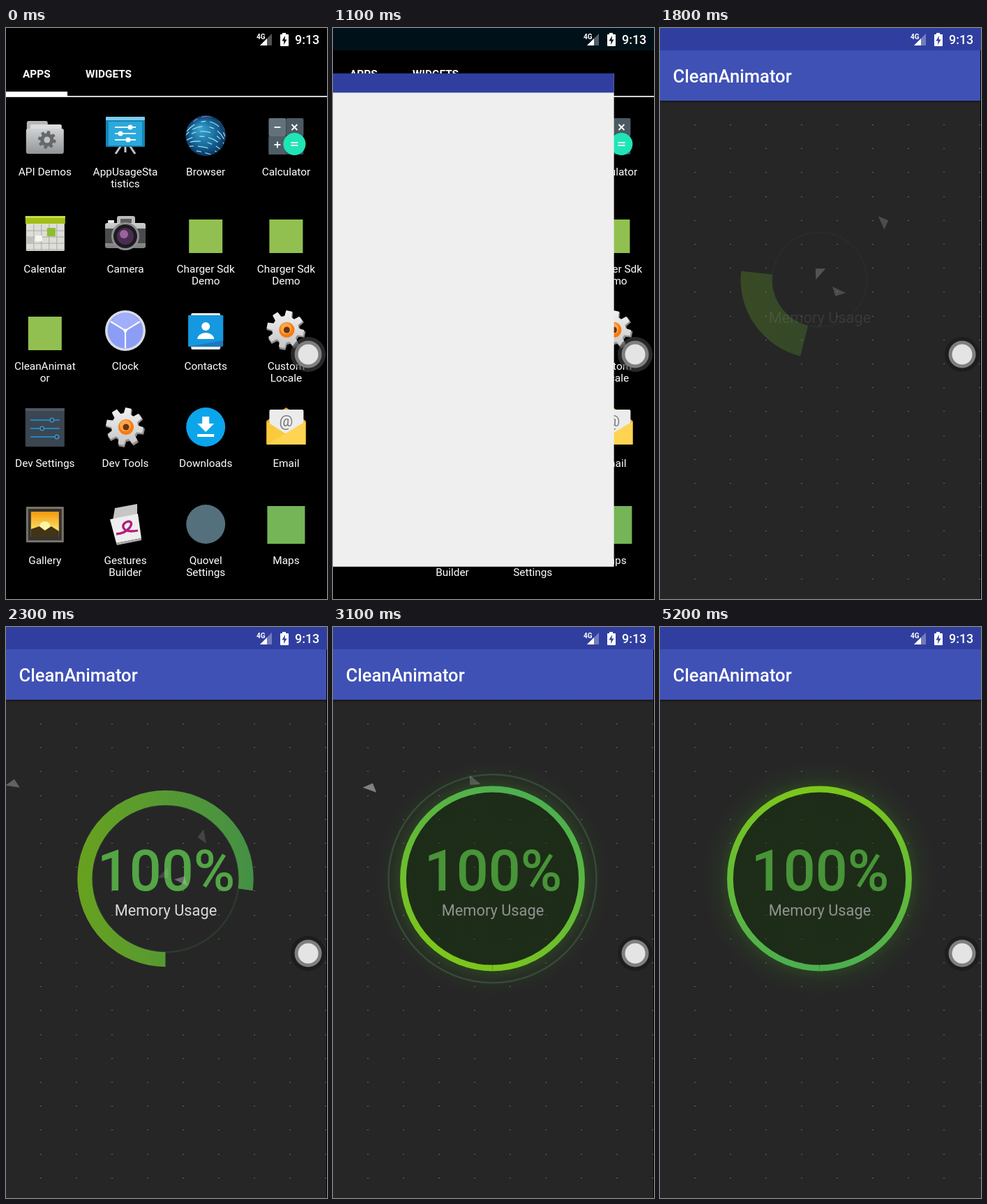
An HTML page with a canvas that plays this animation: 460 by 817 pixels, repeating every 5300 ms.

```html
<!DOCTYPE html>
<html lang="en">
<head>
<meta charset="utf-8">
<title>Memory usage</title>
<style>
html, body { margin: 0; width: 100%; height: 100%; overflow: hidden; background: #000; }
canvas { display: block; }
</style>
</head>
<body>
<canvas id="stage" width="460" height="817"></canvas>
<script>
const W = 460, H = 817, LOOP = 5300, STEP = 100;
const CX = 228.5, CY = 360;
const g = document.getElementById('stage').getContext('2d');
const clamp = (v, lo = 0, hi = 1) => Math.min(hi, Math.max(lo, v));
const lerp = (a, b, p) => a + (b - a) * p;
const rad = deg => deg * Math.PI / 180;

function rect(color, x, y, w, h, r = 0) {
  g.fillStyle = color;
  g.beginPath();
  g.roundRect(x, y, w, h, r);
  g.fill();
}

function disc(color, x, y, r) {
  g.fillStyle = color;
  g.beginPath();
  g.arc(x, y, r, 0, 7);
  g.fill();
}

function ring(color, x, y, r, width, from = 0, to = 360) {
  g.strokeStyle = color;
  g.lineWidth = width;
  g.beginPath();
  g.arc(x, y, r, rad(from), rad(to));
  g.stroke();
}

function poly(color, ...pts) {
  g.fillStyle = color;
  g.beginPath();
  for (let i = 0; i < pts.length; i += 2) g.lineTo(pts[i], pts[i + 1]);
  g.closePath();
  g.fill();
}

function line(color, width, ...pts) {
  g.strokeStyle = color;
  g.lineWidth = width;
  g.beginPath();
  for (let i = 0; i < pts.length; i += 2) g.lineTo(pts[i], pts[i + 1]);
  g.stroke();
}

function text(str, x, y, size, color = '#fff', weight = 400, align = 'center') {
  g.font = `${weight} ${size}px Roboto, sans-serif`;
  g.textAlign = align;
  g.fillStyle = color;
  g.fillText(str, x, y);
}

function fade(top, bottom, y0, y1) {
  const f = g.createLinearGradient(0, y0, 0, y1);
  f.addColorStop(0, top);
  f.addColorStop(1, bottom);
  return f;
}

function gear(color, x, y, r, teeth, depth) {
  const pts = [], unit = Math.PI * 2 / teeth;
  for (let i = 0; i < teeth; i++) {
    for (const [at, len] of [[-.34, r - depth], [-.2, r], [.2, r], [.34, r - depth]]) {
      const a = (i + at) * unit + .2;
      pts.push(x + len * Math.cos(a), y + len * Math.sin(a));
    }
  }
  poly(color, ...pts);
}

function sliders(color, knob, xs, y, gap, half) {
  xs.forEach((x, i) => {
    line(color, 2, -half, y + i * gap, half, y + i * gap);
    disc(knob, x, y + i * gap, 3.5);
  });
}

// Icons are drawn around their own centre.
function toolGear() {
  gear('#8f8f8f', 0, 1, 28, 8, 8);
  gear(fade('#f2f2f2', '#c4c4c4', -28, 28), -1, -1, 27, 8, 8);
  disc('#f57c12', 1, 0, 11);
  disc('#ffa64a', 0, -2, 8);
  disc('#6b3210', 1, 0, 4.5);
}

const greenSquare = () => rect('#92c050', -24, -19, 48, 48);

const icons = {
  folder() {
    rect('#b5b7b9', -26, -21, 30, 14, 3);
    rect('#dcdcdc', -21, -16, 45, 20, 2);
    rect(fade('#d0d2d3', '#929597', -10, 26), -27, -10, 54, 36, 3);
    gear('#65696d', 3, 6, 13, 8, 3.5);
    disc('#c0c2c4', 3, 6, 4.5);
  },
  board() {
    line('#c4c4c4', 3, -6, 14, -14, 26);
    line('#c4c4c4', 3, 6, 14, 14, 26);
    line('#c4c4c4', 3, 0, 14, 0, 24);
    rect('#1385b8', -28, -26, 56, 42, 1);
    rect('#2ba9dc', -24, -20, 48, 34);
    rect('#7ccdec', -28, -27, 56, 5, 1);
    sliders('#e9f7fc', '#fff', [7, -7, 4], -12, 9, 15);
  },
  globe() {
    const f = g.createRadialGradient(-8, -10, 2, 0, 0, 29);
    f.addColorStop(0, '#3aa0cb');
    f.addColorStop(.6, '#176b9c');
    f.addColorStop(1, '#0b3560');
    disc(f, 0, 0, 29);
    g.save();
    g.beginPath();
    g.arc(0, 0, 28, 0, 7);
    g.clip();
    g.setLineDash([15, 10, 7, 6]);
    for (let i = 0; i < 9; i++) {
      g.lineDashOffset = i * 9;
      g.strokeStyle = i > 6 ? '#a46bd0' : '#9bd8ee';
      g.lineWidth = 1.3;
      g.beginPath();
      g.ellipse(-4, 34 - i * 2, 34, 10 + i * 5.5, .25, Math.PI, 6.28);
      g.stroke();
    }
    g.restore();
  },
  calculator() {
    rect('#63717a', -25, -25, 25, 26, 2);
    rect('#4b5963', 0, -25, 25, 26, 2);
    rect('#3c4a54', -25, 1, 50, 26, 2);
    rect('#4f5d66', -25, 1, 25, 26);
    line('#fff', 1.8, -17, -12, -8, -12);
    line('#fff', 1.8, -17, 13, -8, 13);
    line('#fff', 1.8, -12.5, 8.5, -12.5, 17.5);
    line('#fff', 1.8, 8, -16, 16, -8);
    line('#fff', 1.8, 16, -16, 8, -8);
    disc('#1fe5b6', 12, 12, 16);
    line('#fff', 1.8, 7, 10, 17, 10);
    line('#fff', 1.8, 7, 14, 17, 14);
  },
  calendar() {
    rect('#deded8', -27, -24, 55, 50, 1);
    rect('#a2bf18', -28, -24, 57, 11);
    rect('#c2de42', -28, -24, 57, 3);
    for (let x = -16; x < 26; x += 11) line('#a9aaa4', 1, x, -12, x, 25);
    for (let y = -3; y < 25; y += 9) line('#a9aaa4', 1, -27, y, 28, y);
    rect('#f7f7f2', -14, 4, 10, 8);
    rect('#bfc0ba', -26, 7, 9, 9);
    rect('#8fbd30', 3, -7, 12, 12);
  },
  camera() {
    rect('#b9bbbc', -12, -24, 26, 15, 3);
    rect('#5b5d5f', -7, -20, 16, 8, 1);
    rect(fade('#d3d4d5', '#7e8082', -16, 20), -29, -14, 58, 36, 3);
    rect('#4a4b4d', -29, -6, 58, 21);
    disc('#8d8e90', 0, 5, 20);
    disc('#1d1b20', 0, 5, 17);
    disc('#492d51', 0, 5, 12);
    disc('#9c629f', -2, 2, 6);
    rect('#e7e7e7', -25, -18, 9, 4, 1);
  },
  square: greenSquare,
  clock() {
    disc('#d9dbe5', 0, 1, 29);
    disc('#8c9df5', 0, 1, 25.5);
    poly('#a0aefb', 0, 1, -22, -11, -12, -21, 0, -24.5, 12, -21, 22, -11);
    line('#f5f6ff', 2.2, -21, -12, 0, 1, 21, -12);
    line('#f5f6ff', 2.2, 0, 1, 0, 26);
    disc('#fff', 0, 1, 2.5);
  },
  contacts() {
    rect('#e8eaeb', -21, -24, 42, 52, 2);
    rect('#1d78be', -25, -21, 50, 45, 2);
    poly('#1598e0', -25, -21, 25, -21, 25, 15, -25, 24);
    disc('#fff', 0, -5, 6);
    g.fillStyle = '#fff';
    g.beginPath();
    g.ellipse(0, 13, 12, 9, 0, Math.PI, 0);
    g.fill();
  },
  toolGear,
  settings() {
    rect('#3b4650', -28, -27, 56, 55, 1);
    rect('#4c5a66', -28, -27, 56, 4);
    g.save();
    g.translate(0, 1);
    sliders('#1f87c4', '#3d92c9', [10, -4, 17], -11, 12, 21);
    [[10, -11], [-4, 1], [17, 13]].forEach(([x, y]) => disc('#333d46', x, y, 2));
    g.restore();
  },
  download() {
    disc('#0ba5ec', 0, 0, 28);
    poly('#fff', -5, -15, 5, -15, 5, -5, 12, -5, 0, 7, -12, -5, -5, -5);
    rect('#fff', -12, 10, 24, 4);
  },
  email() {
    poly('#e5a91f', -28, -9, 0, -28, 28, -9, 28, 24, -28, 24);
    rect('#ececec', -24, -25, 49, 36, 2);
    text('@', 0, -1, 22, '#787878');
    poly('#fbc93c', -28, -8, 0, 10, 28, -8, 28, 25, -28, 25);
    poly('#ffd452', -28, 25, 28, -8, 28, 25);
  },
  gallery() {
    rect('#77736c', -27, -25, 54, 51, 1);
    rect('#35332f', -24, -22, 48, 45);
    rect(fade('#f19c10', '#ffe16b', -17, 9), -20, -18, 40, 36);
    disc('#fff3a4', 0, 4, 8);
    poly('#423415', -20, 18, -20, 7, -8, 3, 0, 9, 9, 3, 20, 10, 20, 18);
  },
  gestures() {
    poly('#c6c6c6', -15, -23, 17, -29, 17, -11, -18, -5);
    poly('#eeeeee', -22, -7, 18, -15, 23, 20, -13, 27);
    poly('#a8a8a8', -13, 27, 23, 20, 23, 23, -12, 30);
    g.strokeStyle = '#b61d79';
    g.lineWidth = 3.3;
    g.beginPath();
    g.moveTo(-13, 14);
    g.bezierCurveTo(5, 13, 15, -4, 4, -4);
    g.bezierCurveTo(-8, -1, -6, 14, 18, 9);
    g.stroke();
  },
  dot: () => disc('#54707c', 0, 0, 28),
  mapSquare: () => rect('#75b457', -27, -26, 54, 54)
};

const apps = [
  ['folder', 'API Demos'], ['board', 'AppUsageSta', 'tistics'], ['globe', 'Browser'], ['calculator', 'Calculator'],
  ['calendar', 'Calendar'], ['camera', 'Camera'], ['square', 'Charger Sdk', 'Demo'], ['square', 'Charger Sdk', 'Demo'],
  ['square', 'CleanAnimat', 'or'], ['clock', 'Clock'], ['contacts', 'Contacts'], ['toolGear', 'Custom', 'Locale'],
  ['settings', 'Dev Settings'], ['toolGear', 'Dev Tools'], ['download', 'Downloads'], ['email', 'Email'],
  ['gallery', 'Gallery'], ['gestures', 'Gestures', 'Builder'], ['dot', 'Quovel', 'Settings'], ['mapSquare', 'Maps']
];

function launcher() {
  rect('#000', 0, 0, W, H);
  text('APPS', 24, 71, 15.36, '#fff', 700, 'left');
  text('WIDGETS', 114, 71, 15.36, '#fff', 700, 'left');
  rect('#cfd8d3', 0, 97, W, 2);
  rect('#fff', 0, 91, 88, 7);
  apps.forEach(([icon, ...label], i) => {
    const x = 55.8 + i % 4 * 115.2, y = 154 + Math.floor(i / 4) * 139;
    g.save();
    g.translate(x, y);
    icons[icon]();
    g.restore();
    label.forEach((part, n) => text(part, x, y + 56.5 + n * 17.5, 15.36));
  });
}

// Blank window growing out of its launcher cell.
function openingWindow(t) {
  const x = clamp((t - 850) / 420), p = 1 - (1 - x) ** 2;
  const w = lerp(115, 459, p), h = lerp(139, H, p), y = lerp(396, 0, p);
  g.globalAlpha = clamp(x * 3);
  rect('#eeefee', 0, y, w, h);
  rect('#303f9f', 0, y, w, 32 * h / H);
  g.globalAlpha = 1;
}

function statusBar(color) {
  rect(color, 0, 0, W, 32);
  text('4G', 359, 16, 10, '#fff', 700, 'left');
  poly('rgba(255,255,255,.32)', 381, 8, 381, 25, 364, 25);
  poly('#fff', 374, 15, 374, 25, 364, 25);
  rect('#fff', 396, 7, 5, 3);
  rect('#fff', 393, 9, 12, 17, 1);
  poly(color, 400, 11, 395.5, 18.5, 398.5, 18.5, 398, 24, 402.5, 16.5, 399.5, 16.5);
  text('9:13', 414, 23, 17.9, '#fff', 500, 'left');
}

function touchDot(halo) {
  disc(halo, 433, 467, 25);
  disc('#7f7f7f', 433, 467, 19.5);
  disc('#e4e4e4', 433, 467, 14.5);
}

// [start, end, x0, y0, x1, y1, peak alpha, turn]
const shards = [
  [1500, 1900, 436, 468, 195, 347, .25, .15],
  [1500, 1800, 28, 157, 228, 350, .3, 2],
  [1600, 2000, 410, 200, 230, 355, .25, 4],
  [2000, 2400, 420, 232, 236, 323, .2, 1.1],
  [2000, 2400, 348, 390, 220, 354, .45, 3.3],
  [2000, 2400, 120, 390, 263, 341, .2, 5.2],
  [2300, 2700, 10, 225, 215, 350, .4, 3],
  [2700, 3150, 10, 217, 59, 232, .6, 3.2],
  [2800, 3150, 140, 219, 212, 221, .3, .4]
];

function drawShards(t) {
  for (const [t0, t1, x0, y0, x1, y1, alpha, turn] of shards) {
    if (t < t0 || t > t1) continue;
    const p = (t - t0) / (t1 - t0);
    g.save();
    g.translate(lerp(x0, x1, p), lerp(y0, y1, p));
    g.rotate(turn);
    poly(`rgba(190,190,190,${alpha})`, -9, -6, 11, 0, -3, 7);
    g.restore();
  }
}

function ringPaint(t) {
  const left = clamp((3900 - t) / 1600);
  const a = rad(90 - 450 * left ** 1.54), dx = Math.cos(a) * 130, dy = Math.sin(a) * 130;
  const f = g.createLinearGradient(CX - dx, CY - dy, CX + dx, CY + dy);
  f.addColorStop(0, '#7cc61c');
  f.addColorStop(1, '#4caf50');
  return f;
}

function glow(alpha) {
  const f = g.createRadialGradient(CX, CY, 130, CX, CY, 168);
  f.addColorStop(0, `rgba(60,170,20,${.2 * alpha})`);
  f.addColorStop(.4, `rgba(60,150,30,${.07 * alpha})`);
  f.addColorStop(1, 'rgba(60,150,30,0)');
  disc(f, CX, CY, 168);
  disc(`rgba(0,0,0,${.31 * alpha})`, CX, CY, 128);
}

function meter(t) {
  const p = clamp((t - 1590) / 920), lit = clamp((t - 2400) / 300);
  if (p <= 0) return;
  if (lit) glow(lit);

  if (t >= 2600 && t < 3800) {
    const age = (t - 2600) % 600;
    if (age < 550) ring('rgba(90,160,90,.27)', CX, CY, 133 + age * .032, 2.5);
  }
  if (p < 1) ring(`rgba(76,140,70,${.25 * p})`, CX, CY, lerp(52, 121, p), 2.5);

  const start = 90 + 14 * clamp((.772 - p) / .544, 0, 1.4);
  const done = p === 1;
  g.globalAlpha = p;
  ring(ringPaint(t), CX, CY, done ? 128 : lerp(79.8, 126.3, p), done ? 8.8 : lerp(55, 11, p), start, start + 360 * p);
  g.globalAlpha = 1;

  const grey = Math.round(lerp(218, 146, lit));
  g.globalAlpha = clamp((t - 1750) / 500);
  text('Memory Usage', 229, lerp(423.5, 413, clamp((t - 1750) / 450)), 21.8, `rgb(${grey},${grey},${grey})`);
  g.globalAlpha = clamp((t - 1850) / 350);
  text('100%', 229.5, 377, 81, lit > .5 ? '#489438' : '#53a545', 500);
  g.globalAlpha = 1;
}

function app(t) {
  const w = t < 5200 ? 459 : W;
  rect('#262626', 0, 32, w, H - 32);
  for (let y = 138; y < H; y += 34.2)
    for (let x = 49; x < W; x += 51) rect('#686868', x, Math.round(y), 2, 1);
  meter(t);
  drawShards(t);
  rect(fade('rgba(0,0,0,.4)', 'rgba(0,0,0,0)', 104, 108), 0, 104, w, 4);
  rect('#3f51b5', 0, 32, w, 72);
  text('CleanAnimator', 18.5, 78, 25.6, '#fff', 500, 'left');
}

function draw(t) {
  g.clearRect(0, 0, W, H);
  if (t < 1400) {
    launcher();
    if (t >= 900) openingWindow(t);
  } else {
    app(t);
  }
  statusBar(t < 1000 ? '#000' : t < 1200 ? '#011119' : '#303f9f');
  touchDot(t < 1400 ? 'rgba(62,62,62,.65)' : 'rgba(24,24,24,.6)');
}

let shown = -1;
function tick(now) {
  const t = Math.floor(now % LOOP / STEP) * STEP;
  if (t !== shown) draw(shown = t);
  requestAnimationFrame(tick);
}
draw(0);
requestAnimationFrame(tick);
</script>
</body>
</html>
```
